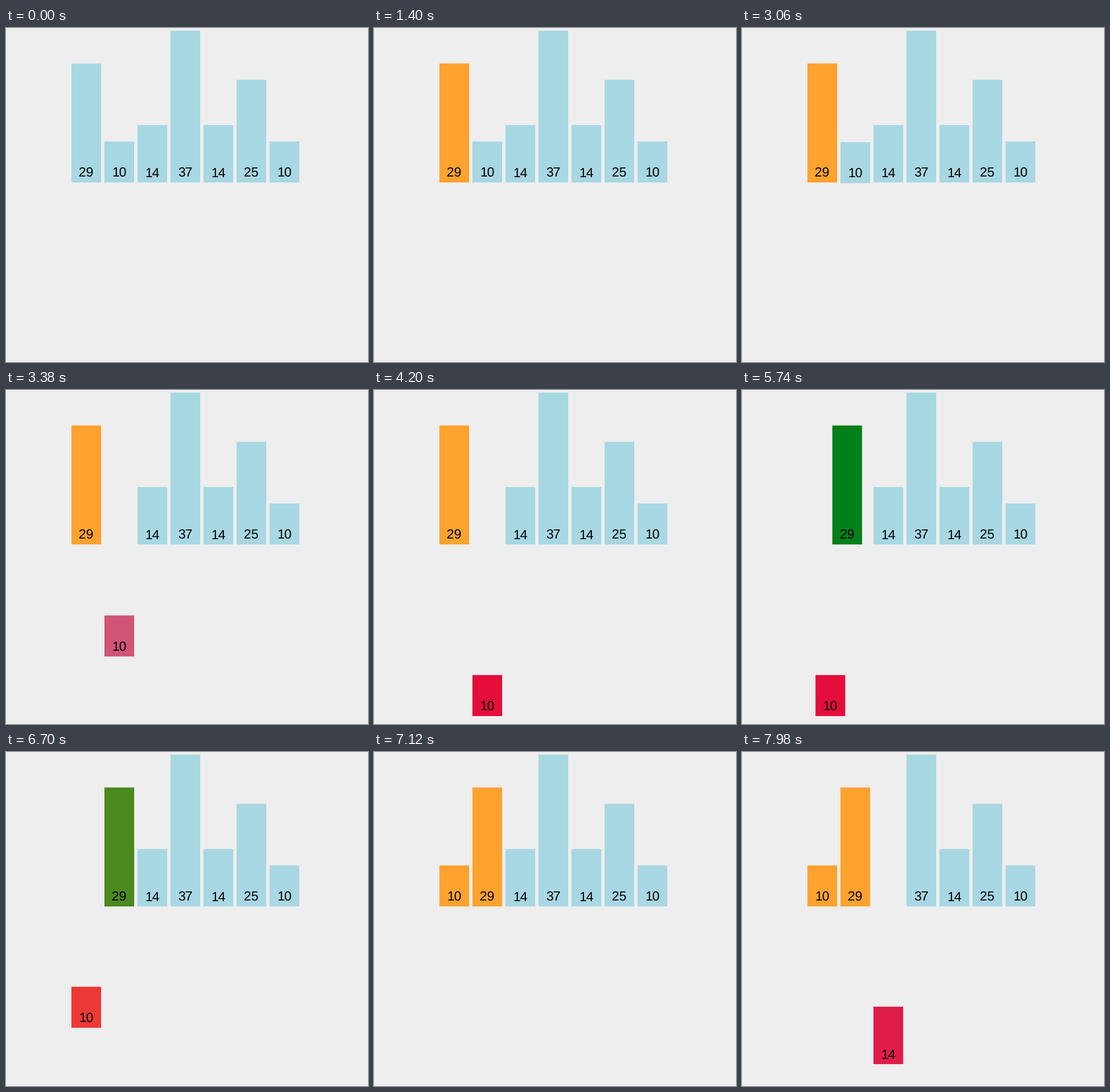
A matplotlib script for the animation above (8 s loop, 548 by 506 pixels).

```python
import numpy as np
import matplotlib.pyplot as plt
from matplotlib.animation import FuncAnimation
from matplotlib.patches import Rectangle

W, H, DPI = 548, 506, 64
LOOP, STEP = 8000, 20

LEFT, PITCH, BAR_W = 99, 50, 45
BASE, DROP = 234, 260
UNIT = 230 / 37

BLUE = (168, 216, 227)
ORANGE = (255, 163, 46)
GREEN = (0, 128, 24)
RED = (229, 13, 58)

VALUES = [29, 10, 14, 37, 14, 25, 10]

# start ms, duration ms, {bar: {property: new value}}
MOVES = [
    (760, 700, {0: {"color": ORANGE}}),
    (2990, 700, {1: {"drop": DROP, "color": RED}}),
    (4120, 700, {0: {"color": GREEN}}),
    (5280, 760, {0: {"slot": 1}, 1: {"slot": 0}}),
    (6405, 705, {0: {"color": ORANGE}, 1: {"drop": 0, "color": ORANGE}}),
    (7471, 700, {2: {"drop": DROP, "color": RED}}),
]


def ease(t):
    """Cubic in-out."""
    t = min(max(t, 0), 1)
    return 4 * t**3 if t < 0.5 else 1 - 4 * (1 - t) ** 3


def state_at(ms):
    bars = [{"slot": i, "drop": 0, "color": np.array(BLUE, float)}
            for i in range(len(VALUES))]
    for start, length, changes in MOVES:
        k = ease((ms - start) / length)
        for i, props in changes.items():
            for name, goal in props.items():
                old = bars[i][name]
                bars[i][name] = old + (np.array(goal) - old) * k
    return bars


plt.rcParams["text.hinting"] = "none"
fig = plt.figure(figsize=(W / DPI, H / DPI), dpi=DPI, facecolor="#eeeeee")
ax = fig.add_axes([0, 0, 1, 1])
ax.set_xlim(0, W)
ax.set_ylim(H, 0)
ax.axis("off")

rects, labels = [], []
for v in VALUES:
    rect = Rectangle((0, 0), BAR_W, v * UNIT, lw=0, snap=False)
    rects.append(ax.add_patch(rect))
    labels.append(ax.text(0, 0, str(v), ha="center", va="baseline",
                          family="Liberation Sans", size=20 * 72 / DPI,
                          color="black"))


def draw(frame):
    for v, bar, rect, label in zip(VALUES, state_at(frame * STEP), rects, labels):
        x = LEFT + PITCH * bar["slot"]
        bottom = BASE + bar["drop"]
        rect.set_xy((x, bottom - v * UNIT))
        rect.set_facecolor(tuple(bar["color"] / 255))
        label.set_position((x + BAR_W / 2, bottom - 8))
    return rects + labels


anim = FuncAnimation(fig, draw, frames=LOOP // STEP, interval=STEP,
                     repeat=True, repeat_delay=0, blit=False)
plt.show()
```
